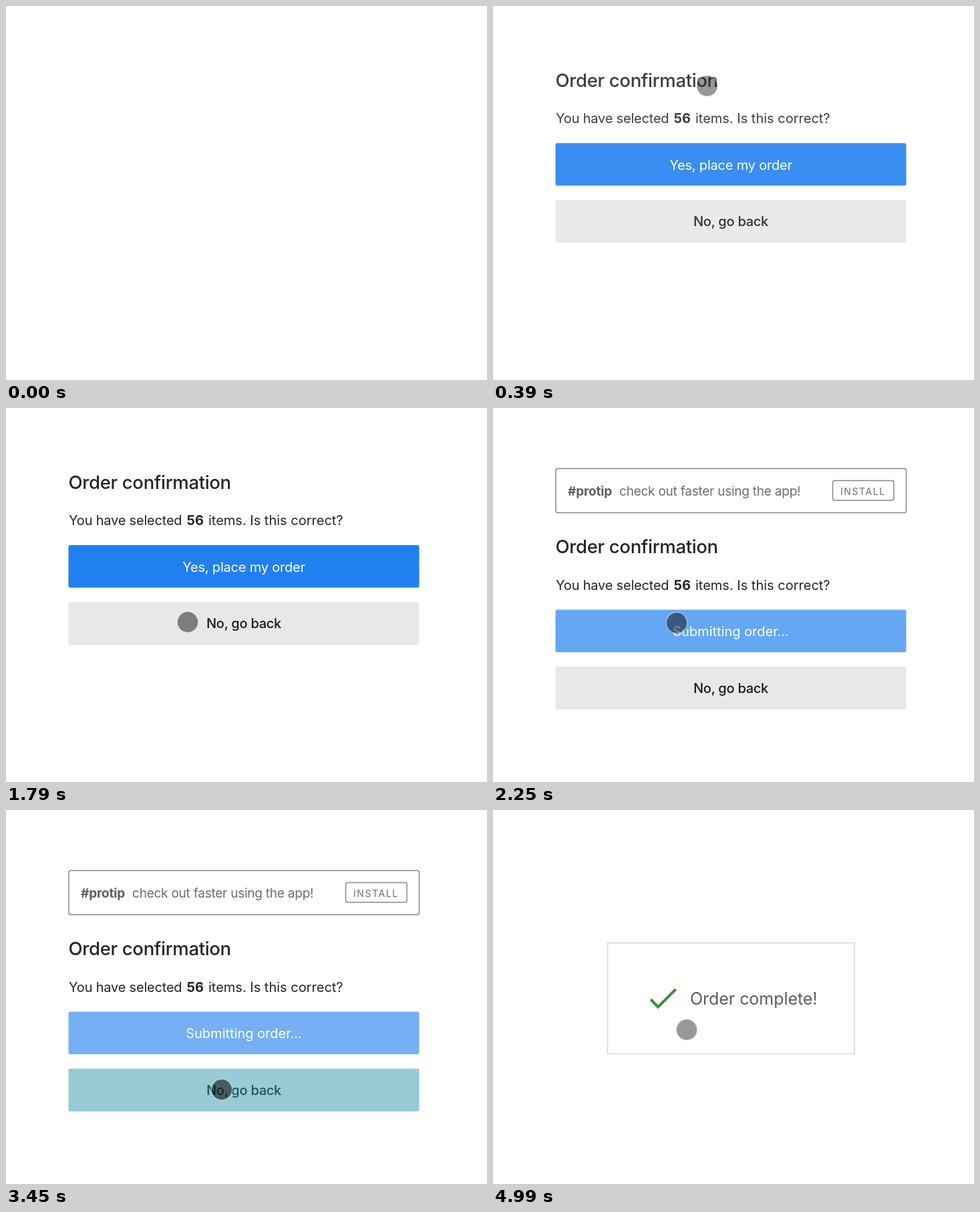
An HTML page for the animation above (5020 ms loop, 720 px wide and 559 px high).

```html
<!DOCTYPE html>
<html lang="en">
<head>
<meta charset="utf-8">
<title>Order confirmation</title>
<style>
  html, body { margin: 0; width: 100%; height: 100%; overflow: hidden; background: #fffffd; }
  svg { display: block; width: 720px; height: 559px; }
  text { font: 400 20px Inter, "Liberation Sans", sans-serif; letter-spacing: -.01em; fill: #212529; }
  .mid { text-anchor: middle; }
  .white { fill: #fff; }
  .loose { letter-spacing: 0; }
  .back { font-weight: 500; letter-spacing: -.013em; fill: #15181b; }
  .bold { font-weight: 700; }
  .title { font-size: 27.5px; font-weight: 500; letter-spacing: -.012em; }
  .tip text { font-size: 19px; letter-spacing: -.012em; fill: #6a6c70; }
  .tip .bold { fill: #5c5e62; letter-spacing: -.01em; }
  .tip .install { font-size: 14px; letter-spacing: 1.6px; }
  .tip rect { fill: none; stroke: #85868a; stroke-width: 1.5; }
  .tap { fill: rgba(40, 165, 185, .42); }
  .done text { font-size: 25px; letter-spacing: -.002em; fill: #44474a; }
</style>
</head>
<body>
<svg viewBox="0 0 720 559">
  <g id="stage">
    <g class="tip" id="tip">
      <rect x="94" y="90.5" width="524.5" height="66" rx="3"/>
      <text class="bold" x="112" y="131">#protip</text>
      <text x="189" y="131">check out faster using the app!</text>
      <rect x="508.5" y="108.5" width="91.5" height="29.5" rx="3"/>
      <text class="install" x="520" y="129.5">INSTALL</text>
    </g>
    <g id="form">
      <text class="title" x="93.5" y="120.5">Order confirmation</text>
      <text x="94" y="175">You have selected</text>
      <text class="bold loose" x="270.5" y="175">56</text>
      <text class="loose" x="303" y="175">items. Is this correct?</text>
      <rect id="yesBox" x="93.5" y="205" width="525" height="63.5" rx="2.5" fill="#2180f0"/>
      <text id="yesText" class="mid white" x="356" y="244.5">Yes, place my order</text>
      <text id="sentText" class="mid white loose" x="356" y="244.5">Submitting order...</text>
      <rect id="yesTap" class="tap" x="93.5" y="205" width="525" height="63.5" rx="2.5"/>
      <rect x="93.5" y="290" width="525" height="64" rx="2.5" fill="#e8e8ea"/>
      <text class="mid back" x="356" y="329.2">No, go back</text>
      <rect id="noTap" class="tap" x="93.5" y="290" width="525" height="64" rx="2.5"/>
    </g>
    <rect id="veil" width="720" height="559" fill="#fffffd"/>
    <rect id="frame" x="171.5" y="198.5" width="369.5" height="166" fill="none" stroke="#d2d2e4" stroke-width="1.5"/>
    <g class="done" id="done">
      <path d="M236 283L247 294.5L273.5 268" fill="none" stroke="#1f7f24" stroke-width="4"/>
      <text x="295" y="291">Order complete!</text>
    </g>
    <circle id="cursor" r="15.7" stroke="#fff" stroke-opacity=".45" stroke-width="1.5"/>
  </g>
</svg>
<script>
const LOOP = 5020;
const SHIFT = 96.5;
const $ = id => document.getElementById(id);

// time, x, y, darkness
const path = [
  [0, 323, 117, .46], [390, 320.5, 119.5, .46], [1060, 316, 127, .46],
  [1580, 272, 320, .46], [1950, 272, 320, .46], [2000, 272, 320, .55],
  [2110, 272, 320, .55], [2200, 273, 320, .46], [2650, 329, 350, .46],
  [2850, 339, 367, .46], [3200, 325, 417, .46], [3360, 323, 418, .55],
  [4300, 321, 418, .52], [4400, 321, 417, .46], [4850, 290, 328.5, .46],
  [LOOP, 290, 328.5, .46]
];

const ramp = (t, a, b) => Math.min(1, Math.max(0, (t - a) / (b - a)));
const smooth = k => k * k * (3 - 2 * k);
const within = (t, a, b) => t >= a && t < b;
const fade = (id, value) => $(id).setAttribute('opacity', value);

function moveCursor(t) {
  const i = path.findIndex(p => p[0] > t);
  const a = path[i - 1], b = path[i];
  const k = smooth(ramp(t, a[0], b[0]));
  const [, x, y, dark] = a.map((v, n) => v + (b[n] - v) * k);
  const c = $('cursor');
  c.setAttribute('cx', x);
  c.setAttribute('cy', y);
  c.setAttribute('fill', `rgba(0,0,0,${dark})`);
}

function draw(t) {
  const shifted = t >= 1920;
  const sent = t >= 2130;
  const veil = ramp(t, 3840, 4440);

  fade('stage', t < 30 ? 0 : ramp(t, 0, 440) * (1 - .12 * ramp(t, 4880, 4990)));
  fade('tip', shifted ? 1 : 0);
  $('form').setAttribute('transform', `translate(0 ${shifted ? SHIFT : 0})`);

  fade('yesBox', 1 - .38 * ramp(t, 2130, 2280));
  fade('yesText', sent ? 0 : 1);
  fade('sentText', sent ? 1 : 0);
  fade('yesTap', within(t, 1990, 2130) ? 1 : 0);
  fade('noTap', within(t, 3360, 3600) ? 1 : 0);

  fade('veil', veil);
  fade('frame', veil);
  fade('done', ramp(t, 3840, 4240));
  moveCursor(t);
}

const start = performance.now();
function tick() {
  draw((performance.now() - start) % LOOP);
  requestAnimationFrame(tick);
}
tick();
</script>
</body>
</html>
```
